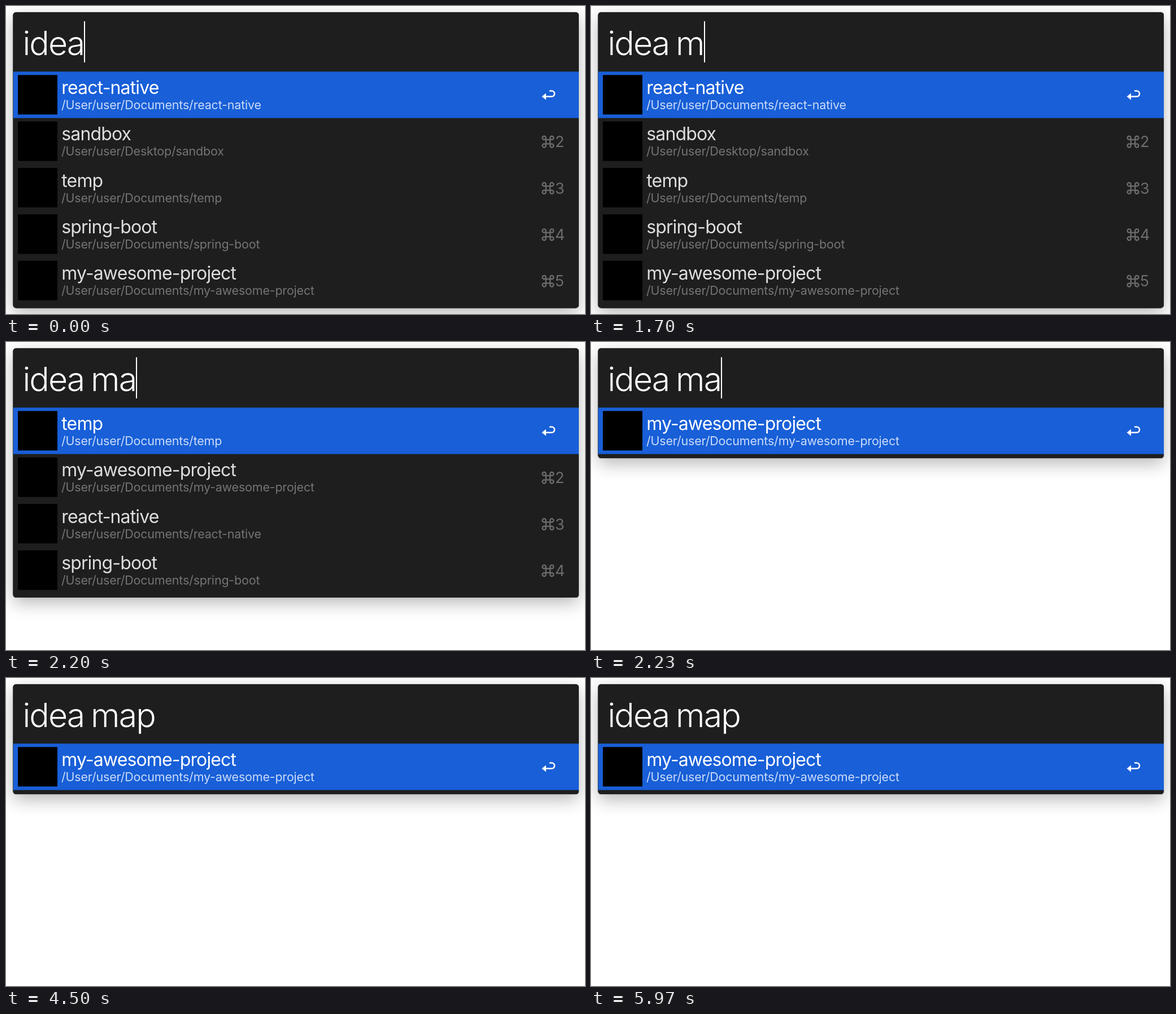
An HTML page with a canvas that plays this animation: 1025x546 px, repeating every 6010 ms.

```html
<!DOCTYPE html>
<html lang="en">
<head>
<meta charset="utf-8">
<title>Project launcher</title>
<style>
html, body { margin: 0; width: 100%; height: 100%; overflow: hidden; background: #fff; }
canvas { display: block; width: 1025px; height: 546px; }
</style>
</head>
<body>
<canvas id="stage" width="1025" height="546"></canvas>
<script>
const ctx = document.getElementById('stage').getContext('2d');
const LOOP = 6010;
const LEFT = 12.5, RIGHT = 1014, TOP = 11;
const LIST_TOP = 116.3, ROW = 82.35;
const FONT = 'Inter, "Liberation Sans", sans-serif';

const folders = {
  'react-native': 'Documents',
  'sandbox': 'Desktop',
  'temp': 'Documents',
  'spring-boot': 'Documents',
  'my-awesome-project': 'Documents'
};

// [start time, value]
const queries = [[0, 'idea'], [930, 'idea '], [1670, 'idea m'], [2170, 'idea ma'], [2700, 'idea map']];
const results = [
  [0, Object.keys(folders)],
  [1770, ['temp', 'my-awesome-project', 'react-native', 'spring-boot']],
  [2230, ['my-awesome-project']]
];

// [time, caret opacity], linear between points
const caret = [
  [0, 1], [230, 1], [400, 0], [890, 0], [930, 1], [1430, 1], [1600, 0], [1669, 0], [1670, 1],
  [3230, 1], [3400, 0], [3870, 0], [4000, 1], [4230, 1], [4400, 0], [4940, 0], [5070, 1],
  [5230, 1], [5400, 0], [LOOP, 0]
];

function current(steps, t) {
  let value = steps[0][1];
  for (const [start, v] of steps) if (t >= start) value = v;
  return value;
}

function ramp(points, t) {
  for (let i = 1; i < points.length; i++) {
    const [t0, a] = points[i - 1], [t1, b] = points[i];
    if (t < t1) return a + (b - a) * (t - t0) / (t1 - t0);
  }
  return points[points.length - 1][1];
}

function text(str, x, y, size, color, spacing = 0, weight = 400) {
  ctx.font = `${weight} ${size}px ${FONT}`;
  ctx.letterSpacing = spacing + 'px';
  ctx.fillStyle = color;
  ctx.fillText(str, x, y);
  return ctx.measureText(str).width;
}

function panelPath(bottom) {
  ctx.beginPath();
  ctx.roundRect(LEFT, TOP, RIGHT - LEFT, bottom - TOP, 5.5);
}

function drawPanel(bottom) {
  ctx.save();
  ctx.fillStyle = '#1e1e1e';
  ctx.shadowColor = 'rgba(0,0,0,.28)';
  ctx.shadowBlur = 30;
  ctx.shadowOffsetY = 10;
  panelPath(bottom);
  ctx.fill();
  ctx.shadowColor = 'rgba(0,0,0,.3)';
  ctx.shadowBlur = 2;
  ctx.shadowOffsetY = 0;
  ctx.fill();
  ctx.restore();
}

function drawReturn(y) {
  ctx.strokeStyle = ctx.fillStyle = '#fff';
  ctx.lineWidth = 2.6;
  ctx.lineCap = 'round';
  ctx.beginPath();
  ctx.moveTo(954, y + 2.5);
  ctx.lineTo(966, y + 2.5);
  ctx.arc(966, y - 2.5, 5, Math.PI / 2, -Math.PI / 2, true);
  ctx.lineTo(963, y - 7.5);
  ctx.stroke();
  ctx.beginPath();
  ctx.moveTo(948.5, y + 2.5);
  ctx.lineTo(956, y - 3.5);
  ctx.lineTo(956, y + 8.5);
  ctx.fill();
}

function drawCommand(cx, cy, color) {
  const a = 3.7, r = 3.1;
  ctx.strokeStyle = color;
  ctx.lineWidth = 2.3;
  ctx.strokeRect(cx - a, cy - a, a * 2, a * 2);
  for (const sx of [-1, 1]) for (const sy of [-1, 1]) {
    ctx.beginPath();
    ctx.arc(cx + sx * (a + r), cy + sy * (a + r), r, 0, Math.PI * 2);
    ctx.stroke();
  }
}

function drawRow(name, i) {
  const y = LIST_TOP + i * ROW;
  const active = i === 0;
  if (active) {
    ctx.fillStyle = '#185fd8';
    ctx.fillRect(LEFT, y, RIGHT - LEFT, ROW);
  }
  ctx.fillStyle = '#000';
  ctx.fillRect(21, y + 6, 70, 70);
  text(name, 98.3, y + 39.7, 32, active ? '#fff' : '#dedede', -0.85);
  text(`/User/user/${folders[name]}/${name}`, 98, y + 66.7, 21.5, active ? '#cbdcf8' : '#747474', -0.2);
  if (active) {
    drawReturn(y + 41.7);
  } else {
    drawCommand(959.5, y + 42, '#6c6c6c');
    text(i + 1, 972, y + 51.7, 27, '#6c6c6c');
  }
}

function drawQuery(query, opacity) {
  ctx.wordSpacing = '-3px';
  const end = 29.5 + text(query, 29.5, 87, 59, '#fff', -1.9, 300);
  ctx.wordSpacing = '0px';
  ctx.globalAlpha = opacity;
  ctx.fillRect(Math.round(end), 27, 2, 73);
}

function draw(t) {
  const rows = current(results, t);
  const bottom = LIST_TOP + rows.length * ROW + 7.4;
  ctx.fillStyle = '#fff';
  ctx.fillRect(0, 0, 1025, 546);
  drawPanel(bottom);
  ctx.save();
  panelPath(bottom);
  ctx.clip();
  rows.forEach(drawRow);
  drawQuery(current(queries, t), ramp(caret, t));
  ctx.restore();
}

const start = performance.now();
function tick() {
  draw((performance.now() - start) % LOOP);
  requestAnimationFrame(tick);
}
tick();
</script>
</body>
</html>
```
